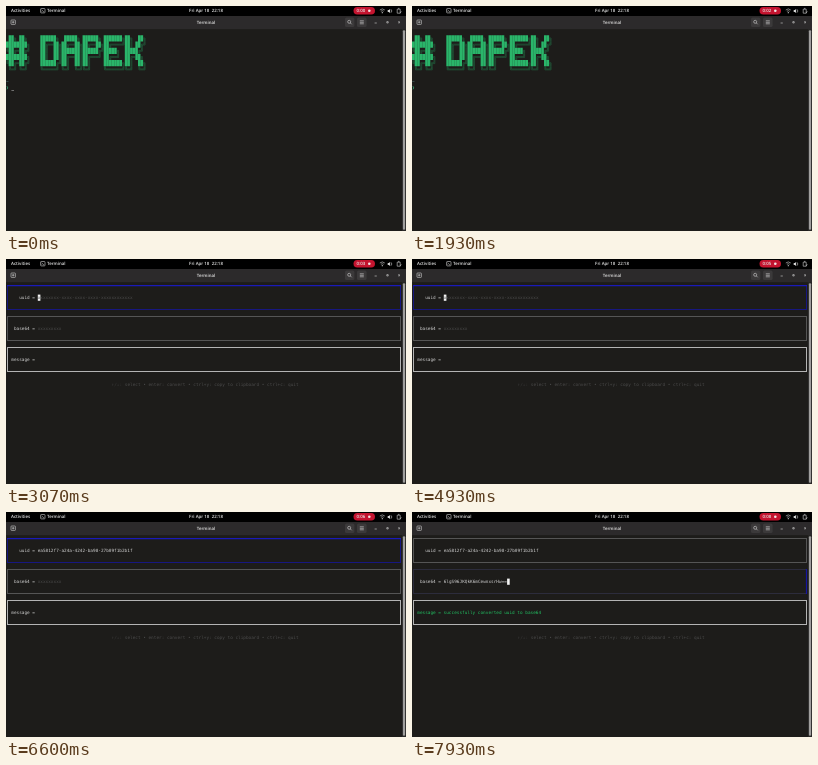
These frames come from a looping animation (400 px wide and 225 px high, 8 s). An HTML page:

```html
<!DOCTYPE html>
<html lang="en">
<head>
<meta charset="utf-8">
<title>Terminal</title>
<style>
  html, body { margin: 0; width: 100%; height: 100%; overflow: hidden; background: #1d1c1a; }
  svg { display: block; }
  text { white-space: pre; text-rendering: geometricPrecision; }
  .ui { font: 600 4.4px "Open Sans", sans-serif; fill: #e4e4e4; }
  .mid { text-anchor: middle; }
  .mono { font: 4.385px "DejaVu Sans Mono", monospace; fill: #cfcfcf; }
  .dim { fill: #4b4b4b; }
  .ok { fill: #22bf62; }
  .line { fill: none; stroke: #d4d4d4; stroke-width: .6; }
  .box { fill: none; stroke: #555; }

  .anim { animation: 8s step-end infinite; }
  .shell { animation-name: shell; }
  .tui { animation-name: tui; }
  .blink { animation-name: blink; }
  .typed { animation-name: typed; }
  .empty { animation-name: empty; }
  .filled { animation-name: filled; }
  .caret { animation-name: caret; }
  .before { animation-name: before; }
  .after { animation-name: after; }
  .clock { animation-name: clock; }

  @keyframes shell { 0% { opacity: 1 } 38.375%, 100% { opacity: 0 } }
  @keyframes tui { 0% { opacity: 0 } 38.375%, 100% { opacity: 1 } }
  @keyframes blink {
    0%, 14.125%, 30% { opacity: 1 }
    6.625%, 21.625%, 36.625%, 100% { opacity: 0 }
  }
  @keyframes typed { 0% { opacity: 0 } 36.625%, 100% { opacity: 1 } }
  @keyframes empty { 0% { opacity: 1 } 62.5%, 100% { opacity: 0 } }
  @keyframes filled { 0% { opacity: 0 } 62.5%, 100% { opacity: 1 } }
  @keyframes caret {
    0%, 69.125%, 82.5%, 100% { opacity: 0 }
    62.5%, 75.875% { opacity: 1 }
  }
  @keyframes before { 0% { opacity: 1 } 84.125%, 100% { opacity: 0 } }
  @keyframes after { 0% { opacity: 0 } 84.125%, 100% { opacity: 1 } }
  @keyframes clock {
    0% { transform: translateY(0) }
    11.625% { transform: translateY(-10px) }
    24.125% { transform: translateY(-20px) }
    36.625% { transform: translateY(-30px) }
    49.125% { transform: translateY(-40px) }
    61.625% { transform: translateY(-50px) }
    74.125% { transform: translateY(-60px) }
    86.625% { transform: translateY(-70px) }
    99.125%, 100% { transform: translateY(-80px) }
  }
</style>
</head>
<body>
<svg width="400" height="225" viewBox="0 0 400 225">
  <rect width="400" height="225" fill="#1d1c1a"/>

  <!-- top bar -->
  <rect width="400" height="10" fill="#000"/>
  <g class="ui">
    <text x="5" y="6.3">Activities</text>
    <text x="41" y="6.3">Terminal</text>
    <text class="mid" x="200" y="6.3">Fri Apr 18&#160; 22:18</text>
  </g>
  <rect class="line" x="34.6" y="2.5" width="4.4" height="4.4" rx=".7"/>
  <path class="line" d="M35.6 3.8l.9 .8-.9 .8M36.9 5.7h1.2"/>
  <rect x="347.5" y="1" width="21.5" height="7.6" rx="3.8" fill="#c4142f"/>
  <svg x="347" y="0" width="14" height="10">
    <g id="clock" class="ui anim clock"></g>
  </svg>
  <circle cx="363.3" cy="4.8" r="1.3" fill="#f4e4e6"/>
  <path class="line" d="M373.8 4q2.5-2.2 5 0M374.9 5.3q1.4-1.2 2.8 0"/>
  <circle cx="376.3" cy="6.7" r=".6" fill="#d4d4d4"/>
  <path d="M381.7 4.1h1.1l1.3-1.2v4.2l-1.3-1.2h-1.1z" fill="#d4d4d4"/>
  <path class="line" d="M385.1 3.4q1.5 1.6 0 3.2"/>
  <path class="line" d="M391.2 3.2h3v4h-3zM392 2.4h1.4M394.2 7.2l1-2"/>

  <!-- window header -->
  <rect y="10" width="400" height="13.2" fill="#2c2a2b"/>
  <rect x="339" y="11.6" width="9.4" height="9.4" rx="1.6" fill="#3b393a"/>
  <rect x="351" y="11.6" width="9.6" height="9.4" rx="1.6" fill="#3b393a"/>
  <text class="ui mid" x="200" y="17.7">Terminal</text>
  <g class="line">
    <rect x="5" y="14" width="4.4" height="4.4" rx=".6"/>
    <path d="M7.2 15v2.4M6 16.2h2.4"/>
    <circle cx="343.2" cy="15.8" r="1.5"/>
    <path d="M344.3 16.9l1.4 1.4M353.8 14.8h4M353.8 16.3h4M353.8 17.8h4"/>
    <path d="M368.6 17h2.2M380.8 15.6h1.4v1.4h-1.4zM392.2 15.4l1.8 1.8M394 15.4l-1.8 1.8"/>
  </g>

  <!-- scrollbar -->
  <rect x="396" y="23.2" width="4" height="202" fill="#292827"/>
  <rect x="396.9" y="24.2" width="2.2" height="199.6" rx="1" fill="#a09f9e"/>

  <g class="mono anim shell">
    <path id="fill" fill="#2ab56a"/>
    <path id="edge" fill="none" stroke="#27a562" stroke-width=".32"/>
    <text x="0" y="77" fill="#6f9aa0">~</text>
    <text x="0" y="83.4" fill="#3fc088">❯</text>
    <rect class="anim blink" x="5.4" y="84" width="2.6" height=".6" fill="#a8a8a8"/>
    <g class="anim typed">
      <text x="5.28" y="83.4" fill="#b9c4be">u62</text>
      <rect x="13.3" y="84" width="2.6" height=".6" fill="#a8a8a8"/>
    </g>
  </g>

  <g class="mono anim tui">
    <rect class="box" x="1.5" y="26.5" width="393" height="24"/>
    <rect class="box" x="1.5" y="57.5" width="393" height="24"/>
    <rect class="box" x="1.5" y="88.5" width="393" height="24" style="stroke:#b4b4b4"/>

    <text x="13.2" y="40.3">uuid =</text>
    <g class="anim empty">
      <text class="dim" x="31.7" y="40.3">xxxxxxxx-xxxx-xxxx-xxxx-xxxxxxxxxxxx</text>
      <rect x="31.8" y="35.6" width="2.6" height="6.2" fill="#f4f4f4"/>
      <text class="dim" x="31.7" y="40.3">x</text>
    </g>
    <text class="anim filled" x="31.7" y="40.3">ea5812f7-a24a-4242-ba98-27b09f1b2b1f</text>
    <rect class="anim caret" x="126.7" y="35.6" width="2.6" height="6.2" fill="#f4f4f4"/>

    <text x="7.92" y="71.3">base64 =</text>
    <g class="anim before">
      <rect class="box" x="1.5" y="26.5" width="393" height="24" style="stroke:#171780"/>
      <path d="M1 26.6H395" stroke="#1a1ab8" stroke-width="1.3"/>
      <text class="dim" x="31.7" y="71.3">xxxxxxxxx</text>
      <text x="5.28" y="102.3">message =</text>
    </g>
    <g class="anim after">
      <rect class="box" x="1.5" y="57.5" width="393" height="24" style="stroke:#2c2c3c"/>
      <path d="M394.5 57V82" stroke="#1616a0" stroke-width="1.2"/>
      <text x="31.7" y="71.3">6lgS96JKQkK6mCewnxsrHw==</text>
      <rect x="95.1" y="66.6" width="2.6" height="6.2" fill="#f4f4f4"/>
      <text class="ok" x="5.28" y="102.3">message = successfully converted uuid to base64</text>
    </g>
    <text class="dim" x="105.6" y="126.8"><tspan fill="#3a3a3a">↑/↓:</tspan> select • enter: convert • ctrl+y: copy to clipboard • ctrl+c: quit</text>
  </g>
</svg>

<script>
const $ = id => document.getElementById(id);

$("clock").innerHTML = Array.from({ length: 9 }, (_, s) =>
  `<text x="3.6" y="${6.3 + s * 10}">0:0${s}</text>`).join("");

const W = 2.64, H = 6.2, TOP = 29.3, GAP = .45;
const banner = [
  " ██╗ ██╗     ██████╗  █████╗ ██████╗ ███████╗██╗  ██╗",
  "████████╗    ██╔══██╗██╔══██╗██╔══██╗██╔════╝██║ ██╔╝",
  "╚██╔═██╔╝    ██║  ██║███████║██████╔╝█████╗  █████╔╝ ",
  "████████╗    ██║  ██║██╔══██║██╔═══╝ ██╔══╝  ██╔═██╗ ",
  "╚██╔═██╔╝    ██████╔╝██║  ██║██║     ███████╗██║  ██╗",
  " ╚═╝ ╚═╝     ╚═════╝ ╚═╝  ╚═╝╚═╝     ╚══════╝╚═╝  ╚═╝",
];
// direction of the horizontal and vertical arm of each corner
const corners = { "╗": [-1, 1], "╔": [1, 1], "╝": [-1, -1], "╚": [1, -1] };

function edge(ch, x, y) {
  const cx = x + W / 2, cy = y + H / 2;
  if (ch === "═") return `M${x} ${cy - GAP}h${W}M${x} ${cy + GAP}h${W}`;
  if (ch === "║") return `M${cx - GAP} ${y}v${H}M${cx + GAP} ${y}v${H}`;
  if (!corners[ch]) return "";
  const [h, v] = corners[ch];
  return [-GAP, GAP].map(d =>
    `M${cx + h * W / 2} ${cy + v * d}H${cx + h * d}V${cy + v * H / 2}`).join("");
}

let blocks = "", edges = "";
banner.forEach((row, r) => [...row].forEach((ch, c) => {
  const x = c * W, y = TOP + r * H;
  if (ch === "█") blocks += `M${x} ${y}h${W - .15}v${H}h${.15 - W}z`;
  else edges += edge(ch, x, y);
}));
$("fill").setAttribute("d", blocks);
$("edge").setAttribute("d", edges);
</script>
</body>
</html>
```
